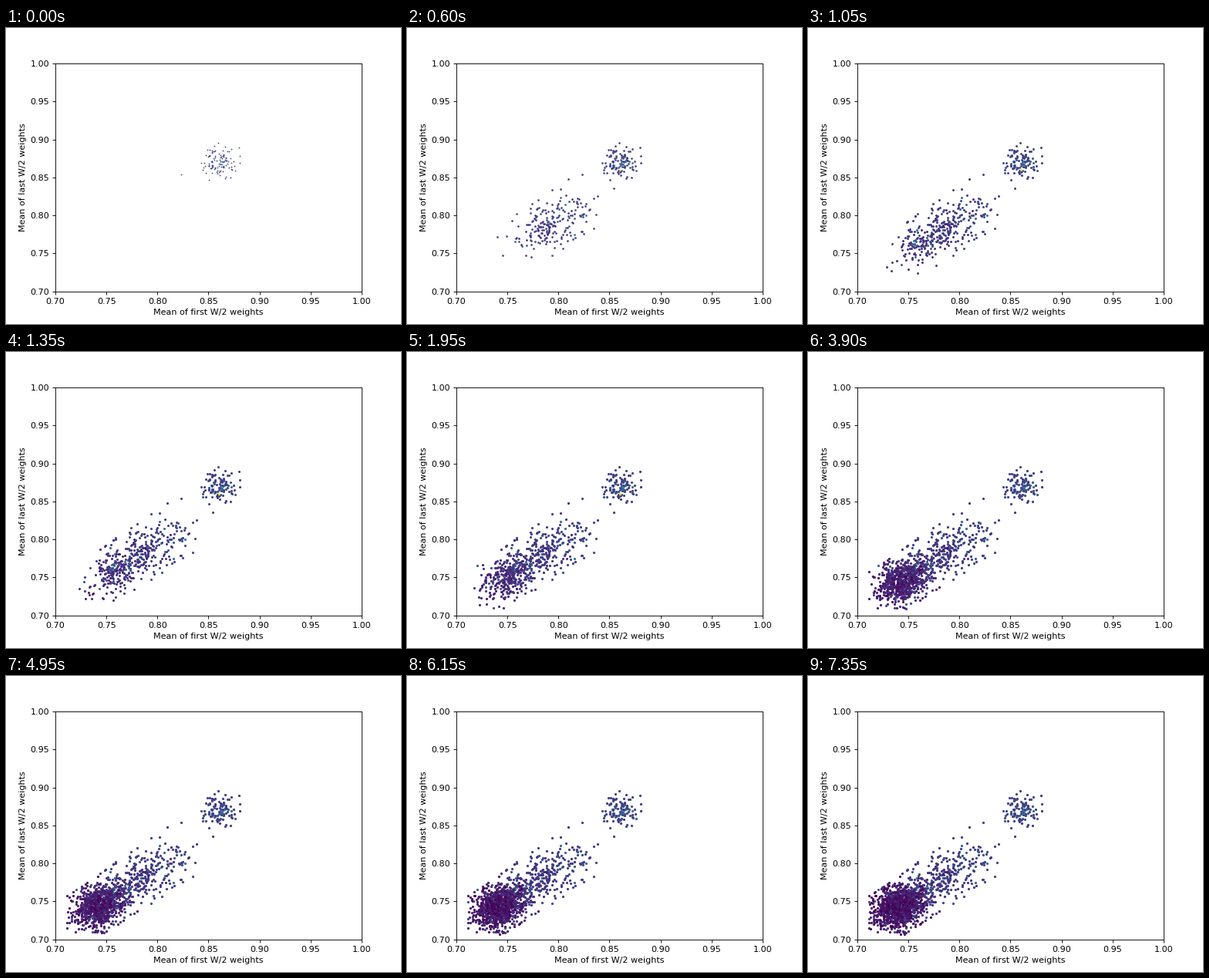
Animation, 512 px wide and 384 px high, one loop 7.5 s. Source, as a matplotlib script:

```python
import numpy as np
import matplotlib.pyplot as plt
from matplotlib.animation import FuncAnimation

W, H, DPI = 512, 384, 80
FRAMES, INTERVAL = 50, 150
rng = np.random.default_rng(11)


def to_data(px):
    """Stage pixels, snapped to pixel centres, as axis values."""
    x, y = (np.floor(px) + 0.5).T
    return np.column_stack([0.7 + 0.3 * (x - 64) / 396.8,
                            0.7 + 0.3 * (341.76 - y) / 295.68])


def shades(n, gen):
    """Fitness values: falling with each generation, with a few high ones."""
    v = rng.normal(0.2 * np.exp(-gen / 22), 0.028, n)
    v += (rng.random(n) < 0.12) * rng.uniform(0.05, 0.2, n)
    return np.clip(v, 0, 1)


def first_cloud():
    """A compact population and one point apart from it."""
    pts = rng.normal((274, 175), (14, 11), (180, 2))
    inside = (abs(pts[:, 0] - 280) < 27) & (abs(pts[:, 1] - 174) < 25)
    return np.vstack([pts[inside][:110], (227, 190)])


def cloud(gen):
    """Points spread along the diagonal, drifting to the lower left."""
    fade = np.exp(-(gen - 1) / 5)
    n = int(16 + 42 * np.exp(-(gen - 1) / 18))
    centre = np.array([114, 303]) + np.array([98, -65]) * fade
    along, across = np.array([0.83, -0.55]), np.array([0.55, 0.83])
    a, b = np.clip(rng.standard_t(9, (2, n, 1)), -2.9, 2.9)
    pts = centre + a * (15 + 7 * fade) * along + b * (11.5 + fade) * across
    return pts[(pts[:, 0] > 78) & (pts[:, 1] < 337)]


clouds = [first_cloud()] + [cloud(g) for g in range(1, FRAMES)]
xy = to_data(np.vstack(clouds))
val = np.concatenate([shades(len(p), g) for g, p in enumerate(clouds)])
live = np.cumsum([len(p) for p in clouds])

fig, ax = plt.subplots(figsize=(W / DPI, H / DPI), dpi=DPI)
ax.set(xlim=(0.7, 1), ylim=(0.7, 1),
       xlabel="Mean of first W/2 weights", ylabel="Mean of last W/2 weights")
dots = ax.scatter(*xy.T, c=val, cmap="viridis", vmin=0, vmax=1, linewidths=0)
best = ax.scatter(*to_data(np.array([[275, 184]])).T, c="#fde725", linewidths=0)


def update(i):
    n = live[i]
    diameter = (3.25 - 1.5 * np.exp(-i / 4)) * 72 / DPI
    dots.set_offsets(xy[:n])
    dots.set_array(val[:n])
    for marks in (dots, best):
        marks.set_sizes([diameter ** 2])
    best.set_visible(i < 22)
    return dots, best


anim = FuncAnimation(fig, update, frames=FRAMES, interval=INTERVAL,
                     repeat=True, repeat_delay=0)
plt.show()
```
